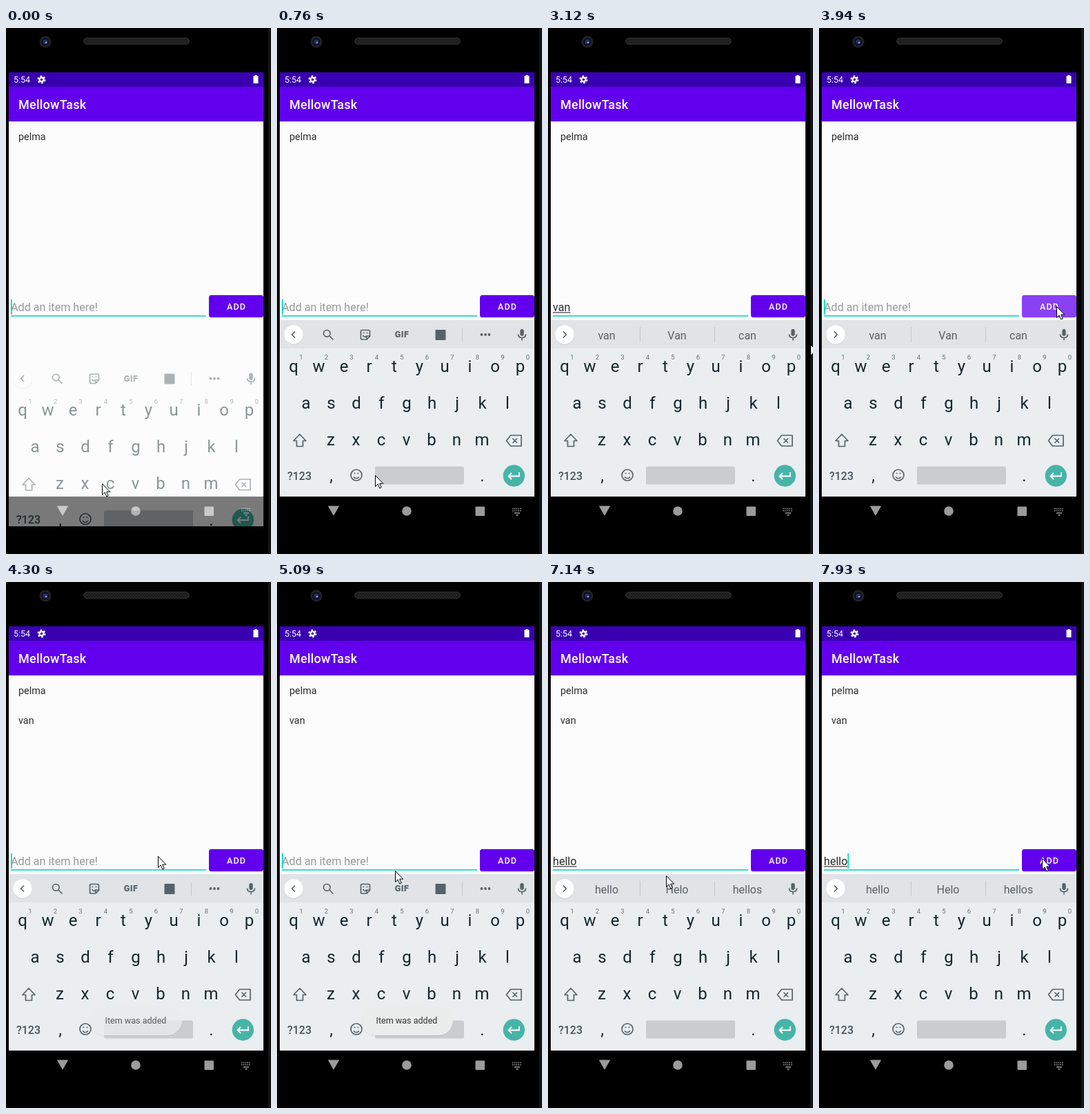
Recreate the animation shown at these times as an HTML page. Size 384 px wide and 760 px high, loop 8000 ms.

```html
<!DOCTYPE html>
<html lang="en">
<head>
<meta charset="utf-8">
<title>To-do list demo</title>
<style>
  html, body { margin: 0; width: 100%; height: 100%; overflow: hidden; background: #000; }
  svg { display: block; width: 384px; height: 760px; font-family: Roboto, sans-serif; }
  .mid { text-anchor: middle; }
  .line { fill: none; stroke: #566269; stroke-width: 1.7; stroke-linejoin: round; }
  .letter { font-size: 24px; fill: #12262d; text-anchor: middle; }
  .digit { font-size: 9.5px; fill: #667177; text-anchor: middle; }
  .word { font-size: 16px; fill: #566067; text-anchor: middle; }
  .strong { font-weight: 700; fill: #10181c; }
  .item { font-size: 14.35px; fill: #2b2b2b; }
  .entry { font-size: 16.15px; fill: #2b2b2b; }
  .icon { fill: #566269; }
</style>
</head>
<body>
<svg viewBox="0 0 384 760" xmlns="http://www.w3.org/2000/svg">
  <defs>
    <clipPath id="screen"><rect x="4" y="422" width="369" height="298"/></clipPath>
    <pattern id="mesh" width="4" height="4" patternUnits="userSpaceOnUse">
      <rect width="4" height="4" fill="#272727"/>
      <circle cx="1" cy="1" r=".9" fill="#111"/><circle cx="3" cy="3" r=".9" fill="#111"/>
    </pattern>
  </defs>

  <!-- phone body -->
  <rect width="384" height="760"/>
  <rect x="380" width="4" height="760" fill="#151515"/>
  <circle cx="57" cy="20" r="8.5" fill="#222225"/>
  <circle cx="57" cy="20" r="5.5" fill="#0d0e1c"/>
  <circle cx="57" cy="20" r="3.6" fill="#232d68"/>
  <circle cx="58" cy="21" r="1.3" fill="#8b9ce0"/>
  <rect x="112.500" y="14.500" width="153" height="9" rx="4.500" fill="url(#mesh)" stroke="#303030"/>

  <!-- app -->
  <rect x="4" y="64" width="369" height="613" fill="#fcfcfc"/>
  <rect x="4" y="64" width="369" height="21" fill="#3900b1"/>
  <rect x="4" y="85" width="369" height="50" fill="#6200ee"/>
  <text x="11" y="79" font-size="12.5" fill="#fff">5:54</text>
  <g transform="translate(51.500 74.500)" fill="none" stroke="#fff">
    <circle r="3" stroke-width="2.400"/>
    <circle r="5" stroke-width="2" stroke-dasharray="2.620 2.620"/>
  </g>
  <path d="M360.500 68h3v1.300h2V80h-7V69.300h2z" fill="#fff"/>
  <text x="18" y="117" font-size="18" font-weight="500" letter-spacing=".23" fill="#fff">MellowTask</text>
  <text class="item" x="18" y="162">pelma</text>
  <text class="item" x="18" y="205.300" id="added">van</text>

  <text class="entry" x="7" y="409" id="entry"></text>
  <rect x="7" y="410.500" height="1.100" fill="#2b2b2b" id="under"/>
  <rect x="7" y="415.200" width="283" height="1.700" fill="#1fd6c8"/>
  <rect y="392" width="1.800" height="22" fill="#03dac5" id="caret"/>
  <rect x="294" y="387" width="79" height="32.500" rx="4" fill="#000" opacity=".14"/>
  <rect x="294" y="386" width="79" height="32" rx="3.500" fill="#6200ee"/>
  <rect x="294" y="386" width="79" height="32" rx="3.500" fill="#fff" id="ripple"/>
  <text class="mid" x="334" y="406.500" font-size="12.560" font-weight="500" letter-spacing="1.120" fill="#fff">ADD</text>

  <!-- navigation bar -->
  <rect x="4" y="677" width="369" height="43"/>
  <g fill="#9b9b9b">
    <path d="M74.500 691h15L82 704z" stroke="#9b9b9b" stroke-linejoin="round"/>
    <circle cx="188" cy="698" r="6.800"/>
    <rect x="287.500" y="691.500" width="13.500" height="13.500" rx="1"/>
    <g stroke="#9b9b9b" stroke-width="1.600" stroke-dasharray="1.600 1.200">
      <path d="M341 694.500h14M341 697.500h14"/>
    </g>
    <path d="M344 700h8v1.500h-8zM345.500 703h5l-2.500 2z"/>
  </g>

  <!-- keyboard -->
  <g clip-path="url(#screen)"><g id="board">
    <rect x="4" y="422" width="369" height="255" id="panel"/>
    <rect x="4" y="422" width="369" height="41" id="strip"/>
    <circle cx="24" cy="443.600" r="14" fill="#000" opacity=".12"/>
    <circle cx="24" cy="443" r="13.800" fill="#fff"/>
    <path class="line" id="chevron"/>
    <g id="tools">
      <circle class="line" cx="72.300" cy="441.300" r="4.800"/>
      <path class="line" d="M76 445l5.500 5.500"/>
      <path class="line" d="M123.500 436.500h9q2 0 2 2v7l-4.500 4.500h-6.500q-2 0-2-2v-9.500q0-2 2-2zM134 445h-4v4.500M124.500 444q2.500 4 5 1M124.500 440.500h2M129.500 440.500h2" stroke-width="1.500"/>
      <text class="mid icon" x="181" y="447.300" font-size="12.500" font-weight="900" letter-spacing=".4">GIF</text>
      <rect class="icon" x="229.500" y="436" width="15" height="15" rx="1"/>
      <path d="M268.500 434v19" stroke="#c3c9cd"/>
      <g class="icon"><circle cx="296.500" cy="443" r="1.900"/><circle cx="302" cy="443" r="1.900"/><circle cx="307.500" cy="443" r="1.900"/></g>
    </g>
    <g id="words">
      <path d="M133.500 432v22M241.500 432v22" stroke="#c3c9cd"/>
      <text class="word" x="85" y="449.500"></text>
      <text class="word" x="187" y="449.500"></text>
      <text class="word" x="289" y="449.500"></text>
    </g>
    <rect class="icon" x="352.300" y="435" width="5.400" height="10" rx="2.700"/>
    <path class="line" d="M349.500 442.500q0 5 5.500 5t5.500-5M355 447.500v4"/>
    <g id="keys"></g>
    <path class="line" d="M33 587l9 9.500h-4.500v8h-9v-8H24z"/>
    <path class="line" d="M338.500 588.500h15.500v15.500h-15.500l-6-7.750zM341.500 593l6.500 6.500M348 593l-6.500 6.500"/>
    <text class="mid" x="32.500" y="652.500" font-size="16" font-weight="500" fill="#45535a">?123</text>
    <text class="letter" x="78.500" y="655">,</text>
    <circle class="line" cx="115" cy="646" r="8"/>
    <path class="line" d="M111 648.500q4 4.500 8 0M111.500 643.500h2M116.500 643.500h2"/>
    <rect x="142" y="633.500" width="129" height="26" rx="2.500" fill="#c9cdd0"/>
    <text class="letter" x="297.500" y="655">.</text>
    <circle cx="343.300" cy="647" r="15.700" fill="#47b4a8"/>
    <path d="M351 642v5.500h-15M340 643l-4.500 4.500 4.500 4.500" fill="none" stroke="#fff" stroke-width="1.900"/>
  </g></g>

  <g id="toast">
    <rect x="122" y="614" width="133" height="42" rx="21" fill="#000" opacity=".07"/>
    <rect x="122" y="613" width="133" height="42" rx="21" fill="#ebecec"/>
    <text class="mid" x="188" y="638" font-size="12.560" fill="#333">Item was added</text>
  </g>
  <path id="mouse" d="M.5.5v16l3.700-3.400 2.600 5.900 2.500-1.100-2.600-5.700h5z" fill="#fff" stroke="#000"/>
</svg>
<script>
const LOOP = 8000;
const $ = id => document.getElementById(id);

function label(parent, cls, x, y, str) {
  const el = document.createElementNS('http://www.w3.org/2000/svg', 'text');
  el.setAttribute('class', cls);
  el.setAttribute('x', x);
  el.setAttribute('y', y);
  el.textContent = str;
  parent.append(el);
}

[['qwertyuiop', 24, 496.5], ['asdfghjkl', 42, 549.5], ['zxcvbnm', 78, 602.5]].forEach(([row, x0, y], r) => {
  [...row].forEach((ch, i) => {
    const x = x0 + i * 36.5;
    label($('keys'), 'letter', x, y, ch);
    if (r === 0) label($('keys'), 'digit', x + 11, 479, (i + 1) % 10);
  });
});

// Each step holds until the next; only changed values are listed.
const start = { mouse: [139, 658], slide: 63.5, fade: .48, caret: 1, text: '', words: '', press: 0, added: 0, toast: 0 };
const changes = [
  [0, {}],
  [120, { slide: 18, fade: .85, mouse: [141, 656] }],
  [240, { slide: 0, fade: 1, caret: 0, mouse: [142, 654] }],
  [390, { mouse: [142, 646] }],
  [760, { caret: 1 }],
  [1280, { text: 'va', words: 'va van can' }],
  [1400, { text: 'van', words: 'van Van can' }],
  [1930, { caret: 0 }],
  [2430, { caret: 1 }],
  [2710, { mouse: [144, 645] }],
  [2860, { mouse: [400, 500] }],
  [2980, { caret: 0 }],
  [3120, { mouse: [380, 457] }],
  [3240, { mouse: [355, 432] }],
  [3390, { mouse: [346, 408] }],
  [3520, { mouse: [344, 402], caret: 1 }],
  [3670, { press: .12 }],
  [3800, { press: .25 }],
  [3940, { text: '' }],
  [4060, { added: 1, words: '', press: .18 }],
  [4180, { press: .07, toast: .3, mouse: [305, 400] }],
  [4300, { press: 0, toast: .75, mouse: [220, 396] }],
  [4420, { toast: 1, caret: 0, mouse: [160, 395] }],
  [4690, { mouse: [163, 398] }],
  [4840, { caret: 1, mouse: [166, 405] }],
  [4960, { mouse: [170, 413] }],
  [5090, { mouse: [171, 417] }],
  [5380, { caret: 0 }],
  [5820, { caret: 1 }],
  [5940, { text: 'h', words: 'h he hey' }],
  [6060, { toast: .8 }],
  [6180, { text: 'he', words: 'he hey hello', toast: .35 }],
  [6330, { text: 'hel', words: 'hel *he hey', toast: 0 }],
  [6480, { text: 'hell', words: 'hell hello he’ll' }],
  [6600, { text: 'hello', words: 'hello Helo hellos' }],
  [7140, { caret: 0, mouse: [171, 424] }],
  [7270, { mouse: [171, 432] }],
  [7420, { mouse: [192, 438] }],
  [7540, { mouse: [240, 433] }],
  [7660, { caret: 1, mouse: [286, 423] }],
  [7810, { mouse: [306, 409] }],
  [7930, { mouse: [323, 399] }]
];
let last = start;
const steps = changes.map(([at, change]) => ({ at, state: last = { ...last, ...change } }));

function set(id, attrs) {
  for (const name in attrs) $(id).setAttribute(name, attrs[name]);
}

function draw(s) {
  const entry = $('entry');
  entry.textContent = s.text || 'Add an item here!';
  entry.style.fill = s.text ? '' : '#999';
  const width = s.text ? entry.getComputedTextLength() : 0;
  set('under', { width });
  set('caret', { x: 7 + width, opacity: s.caret });
  set('ripple', { opacity: s.press });
  set('added', { opacity: s.added });
  set('toast', { opacity: s.toast });
  set('board', { transform: `translate(0 ${s.slide})`, opacity: s.fade });
  set('panel', { fill: s.fade < .5 ? '#fcfcfc' : '#eaeef1' });
  set('strip', { fill: s.fade < .5 ? '#fcfcfc' : '#e0e4e7' });
  set('tools', { visibility: s.words ? 'hidden' : 'visible' });
  set('words', { visibility: s.words ? 'visible' : 'hidden' });
  set('chevron', { d: s.words ? 'M22 438.500l4.500 4.500-4.500 4.500' : 'M26 438.500l-4.500 4.500 4.500 4.500' });
  const words = s.words.split(' ');
  $('words').querySelectorAll('text').forEach((el, i) => {
    const word = words[i] || '';
    el.classList.toggle('strong', word[0] === '*');
    el.textContent = word.replace('*', '');
  });
  set('mouse', { transform: `translate(${s.mouse})` });
}

const t0 = performance.now();
let shown = null;
function tick() {
  const t = (performance.now() - t0) % LOOP;
  const step = steps.findLast(s => s.at <= t);
  if (step !== shown) draw((shown = step).state);
  requestAnimationFrame(tick);
}
tick();
</script>
</body>
</html>
```
